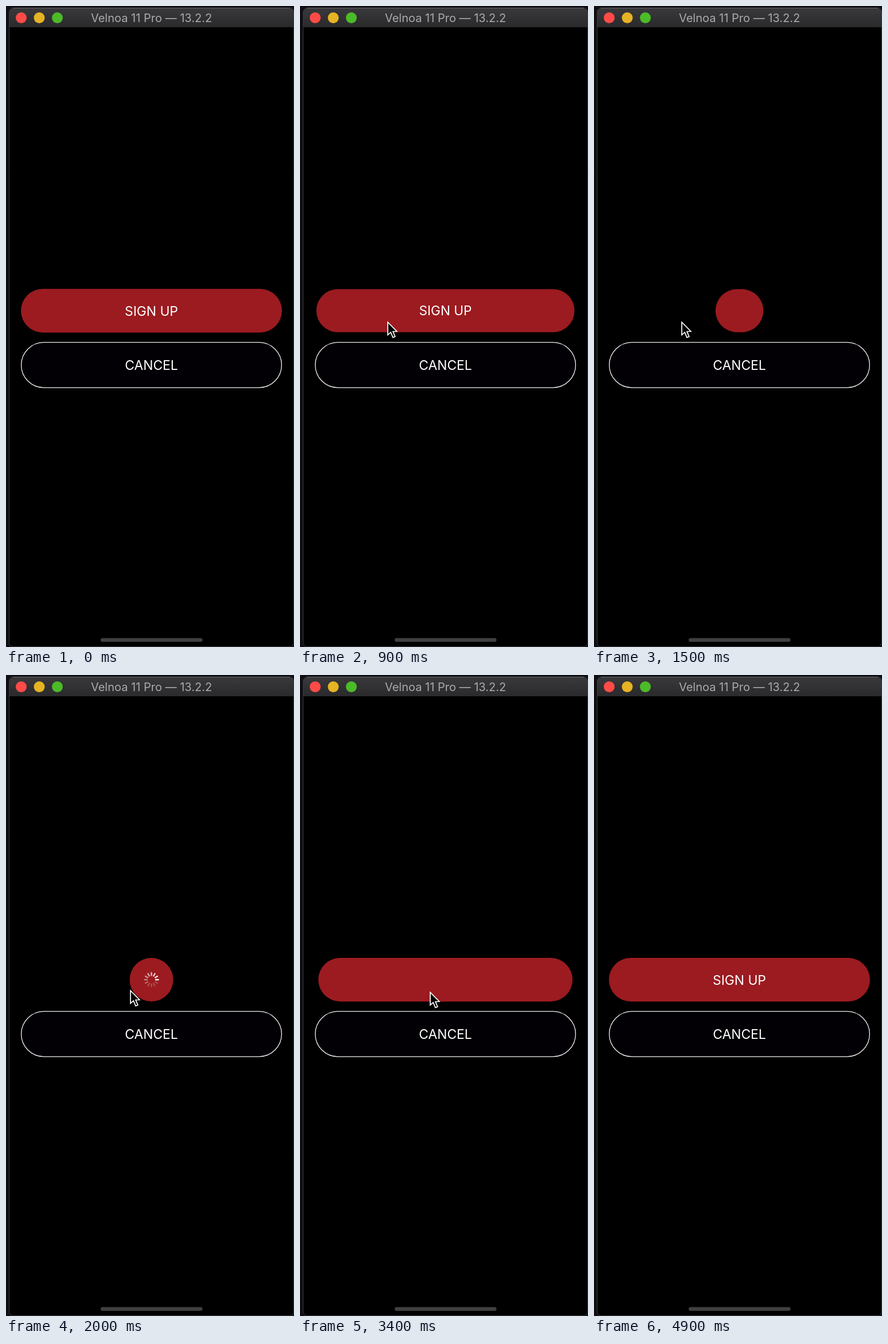
An HTML page with a canvas for the animation above (5000 ms loop, 502x1115 px).

```html
<!DOCTYPE html>
<html lang="en">
<head>
<meta charset="utf-8">
<title>Button loading animation</title>
<style>
  html, body { margin: 0; width: 100%; height: 100%; overflow: hidden; background: #0f0e13; }
  canvas { display: block; width: 502px; height: 1115px; }
</style>
</head>
<body>
<canvas id="stage" width="502" height="1115"></canvas>
<script>
const ctx = document.getElementById('stage').getContext('2d');
const LOOP = 5000, STEP = 100;
const CENTER_X = 253.5, BUTTON_Y = 530;
const FULL_WIDTH = 455, BUTTON_HEIGHT = 76;
const COLLAPSE = 1143, EXPAND = 3050, RESIZE = 400;
const FONT = 'Inter, "Open Sans", sans-serif';

// Pointer waypoints: time, x, y
const POINTER = [
  [300, 112, 585], [500, 148, 553], [600, 153, 549], [1600, 153, 549],
  [2000, 217, 548], [2400, 227, 551], [3800, 227, 551], [4000, 190, 535]
];

const clamp = v => Math.min(1, Math.max(0, v));
const mix = (a, b, p) => a + (b - a) * p;
const easeInOut = u => u < 0.5 ? 2 * u * u : 1 - 2 * (1 - u) ** 2;
const progress = (t, start, length) => easeInOut(clamp((t - start) / length));

function roundBox(x, y, w, h, r) {
  ctx.beginPath();
  ctx.roundRect(x, y, w, h, r);
}

function disc(x, y, r, color) {
  ctx.fillStyle = color;
  ctx.beginPath();
  ctx.arc(x, y, r, 0, Math.PI * 2);
  ctx.fill();
}

function label(text, x, baseline, size, color) {
  ctx.font = `${size}px ${FONT}`;
  ctx.textAlign = 'center';
  ctx.textBaseline = 'alphabetic';
  ctx.fillStyle = color;
  ctx.fillText(text, x, baseline);
}

function drawWindow() {
  ctx.fillStyle = '#0f0e13';
  ctx.fillRect(0, 0, 502, 1115);
  roundBox(5.5, 4, 496, 1110, 7);
  ctx.fillStyle = '#000';
  ctx.fill();

  const bar = ctx.createLinearGradient(0, 4, 0, 37);
  bar.addColorStop(0, '#39383b');
  bar.addColorStop(1, '#2a292c');
  roundBox(5.5, 4, 496, 33, [7, 7, 0, 0]);
  ctx.fillStyle = bar;
  ctx.fill();

  roundBox(5.5, 3.5, 496, 1111, 7);
  ctx.strokeStyle = '#3b3b3e';
  ctx.lineWidth = 1;
  ctx.stroke();
  ctx.fillStyle = '#69686b';
  ctx.fillRect(12, 3, 483, 1);

  ['#ff4b47', '#e5b323', '#4bbb28'].forEach((color, i) =>
    disc(26.5 + i * 31.5, 20.5, 9.5, color));
  label('Velnoa 11 Pro — 13.2.2', CENTER_X, 28, 20, '#aaa9ac');

  roundBox(165, 1099.5, 177.5, 6.5, 3.25);
  ctx.fillStyle = '#404040';
  ctx.fill();
}

function drawCancel() {
  roundBox(26.6, 585.2, 453.8, 78.6, 39.3);
  ctx.fillStyle = '#020005';
  ctx.fill();
  ctx.strokeStyle = '#f2f2f2';
  ctx.lineWidth = 1.3;
  ctx.stroke();
  label('CANCEL', CENTER_X, 633, 22.8, '#fff');
}

function drawSpinner(t) {
  const head = Math.floor((t - 1745) / (1000 / 12));
  ctx.lineCap = 'round';
  ctx.lineWidth = 2.4;
  for (let i = 0; i < 12; i++) {
    const age = ((head - i) % 12 + 12) % 12;
    const angle = i * Math.PI / 6;
    const dx = Math.sin(angle), dy = -Math.cos(angle);
    ctx.strokeStyle = `rgba(255,255,255,${Math.max(0.22, 1 - age * 0.095)})`;
    ctx.beginPath();
    ctx.moveTo(dx * 7.6, dy * 7.6);
    ctx.lineTo(dx * 12, dy * 12);
    ctx.stroke();
  }
}

function drawSignUp(t) {
  const collapsed = progress(t, COLLAPSE, RESIZE) - progress(t, EXPAND, RESIZE);
  const pressed = progress(t, 813, 300) - progress(t, 1300, 300);
  const width = mix(FULL_WIDTH, BUTTON_HEIGHT, collapsed);
  const scale = mix(1, 0.934, pressed);

  ctx.save();
  ctx.translate(CENTER_X, BUTTON_Y);
  ctx.scale(scale, scale);
  roundBox(-width / 2, -BUTTON_HEIGHT / 2, width, BUTTON_HEIGHT, BUTTON_HEIGHT / 2);
  ctx.fillStyle = '#9b1b20';
  ctx.fill();
  if (t < COLLAPSE || t >= EXPAND + RESIZE) label('SIGN UP', 0, 8.5, 22.8, '#fff');
  else if (t >= COLLAPSE + RESIZE && t < EXPAND) drawSpinner(t);
  ctx.restore();
}

function drawPointer(t) {
  const next = POINTER.findIndex(point => point[0] > t);
  if (next < 1) return;
  const [t0, x0, y0] = POINTER[next - 1], [t1, x1, y1] = POINTER[next];
  const p = progress(t, t0, t1 - t0);

  ctx.save();
  ctx.translate(mix(x0, x1, p), mix(y0, y1, p));
  ctx.beginPath();
  [[0, 1], [0, 23.2], [5.2, 18.6], [9, 27.6], [12.8, 26], [9, 17.2], [15.8, 17]]
    .forEach(([x, y]) => ctx.lineTo(x, y));
  ctx.closePath();
  ctx.fillStyle = '#000';
  ctx.fill();
  ctx.strokeStyle = '#fff';
  ctx.lineWidth = 1.7;
  ctx.lineJoin = 'miter';
  ctx.stroke();
  ctx.restore();
}

function draw(now) {
  const t = Math.floor((now % LOOP) / STEP) * STEP;
  drawWindow();
  drawCancel();
  drawSignUp(t);
  drawPointer(t);
}

const began = performance.now();
function tick() {
  draw(performance.now() - began);
  requestAnimationFrame(tick);
}
tick();
</script>
</body>
</html>
```
